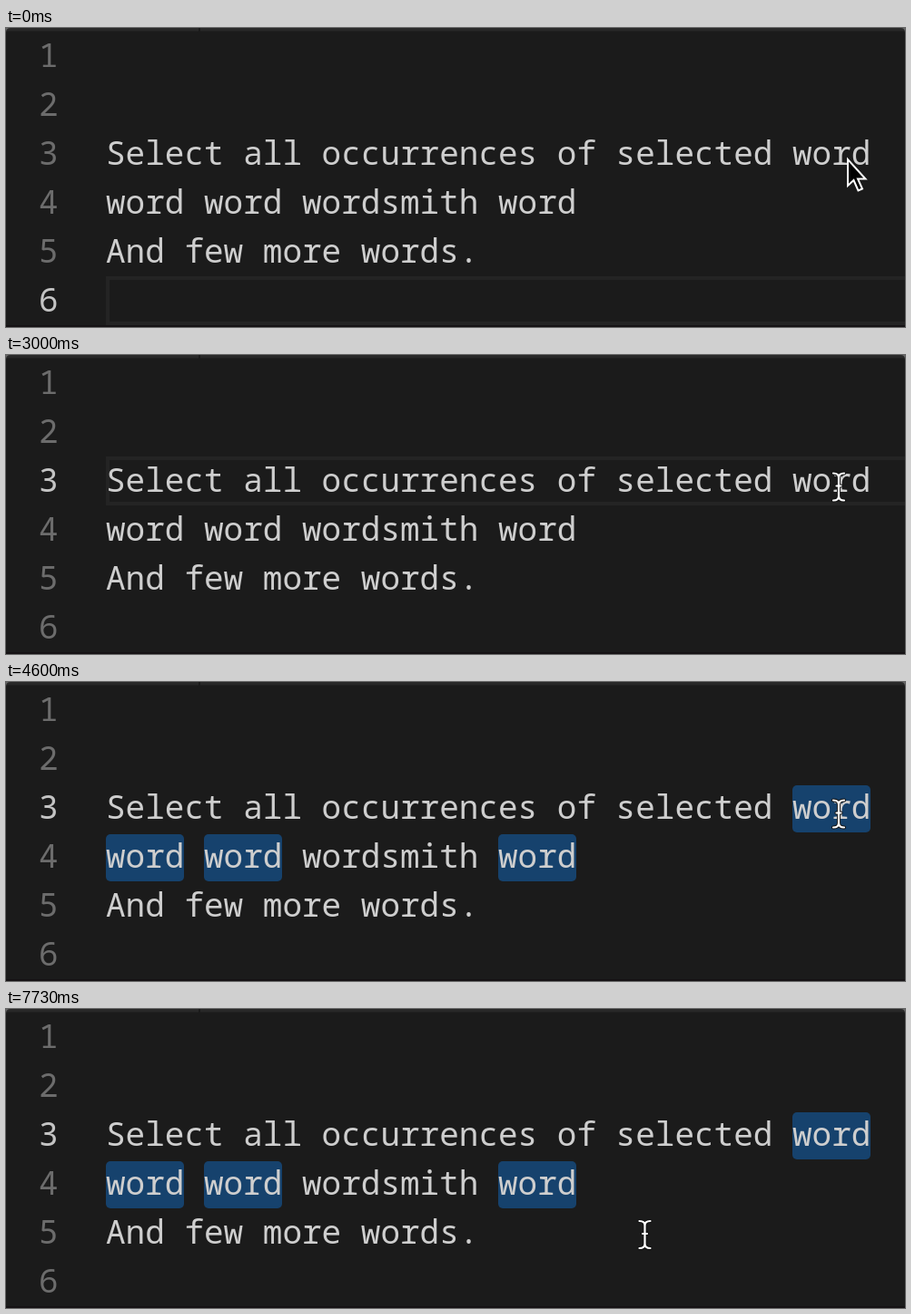
Write an HTML page that moves like this. It is 990 px wide and 330 px high and loops after 8 s.

```html
<!DOCTYPE html>
<html lang="en">
<head>
<meta charset="utf-8">
<title>Select all occurrences</title>
<style>
  html, body { margin: 0; width: 100%; height: 100%; overflow: hidden; background: #1b1b1b; }
  svg { display: block; width: 990px; height: 330px; }
  text { font: 36px "Noto Sans Mono", monospace; fill: #cecece; }
  .number { fill: #6c6c6c; }
  .number.active { fill: #c4c4c4; }
  .selection { fill: #16426d; }
  .caret { fill: #aeafad; }
  #toast path { fill: none; stroke: #acacac; stroke-width: 4; stroke-linejoin: round; }
  #toast text { font: 53px Inter, sans-serif; fill: #acacac; }
  #toast g { filter: drop-shadow(0 2px 2px #000a); }
</style>
</head>
<body>
<svg viewBox="0 0 990 330">
  <defs>
    <path id="beamShape" d="M-6-15Q0-15 0-10Q0-15 6-15M0-10V10M-6 15Q0 15 0 10Q0 15 6 15M-2.500-1H2.500"/>
  </defs>
  <rect width="990" height="330" fill="#1b1b1b"/>
  <rect width="990" height="3.5" fill="#292929"/>
  <rect x="212" width="2" height="4" fill="#1b1b1b"/>
  <path d="M0 0H5Q0 0 0 5ZM990 0h-5q5 0 5 5Z" fill="#666"/>
  <rect y="328" width="990" height="2" fill="#151214"/>
  <rect id="lineBox" x="112" width="900" height="50" fill="none" stroke="#242424" stroke-width="4"/>
  <g id="selections"></g>
  <g id="lines"></g>
  <g id="carets"></g>
  <rect id="singleCaret" class="caret" x="908" y="112" width="4" height="54"/>
  <g id="toast">
    <rect x="98" y="16" width="169" height="90" rx="29" fill="#3c3c3c"/>
    <g>
      <path d="M143.5 47 163.5 66H154V81.500H133V66H123.500Z"/>
      <path transform="translate(192.500 64)" d="M6-11.500a5.500 5.500 0 1 1 5.500 5.500H-11.500a5.500 5.500 0 1 1 5.500-5.500V11.500a5.500 5.500 0 1 1-5.500-5.500H11.500a5.500 5.500 0 1 1-5.500 5.500Z"/>
      <text x="214" y="82">L</text>
    </g>
  </g>
  <path id="arrow" d="M1 2V31L7.500 25 12.500 36.500 17 34.500 12 23.500H20.500Z" fill="#000" stroke="#fff" stroke-width="2"/>
  <g id="beam" fill="none" stroke-linecap="round">
    <use href="#beamShape" stroke="#111" stroke-width="4"/>
    <use href="#beamShape" stroke="#fff" stroke-width="2.200"/>
  </g>
</svg>
<script>
const LOOP = 8000, LINE = 54, COLUMN = 21.6, LEFT = 110;
const CLICK = 530, SELECT = 3070, TOAST_FADE = 4070;
const $ = id => document.getElementById(id);

function add(parent, tag, attributes, content = '') {
  const node = document.createElementNS('http://www.w3.org/2000/svg', tag);
  for (const key in attributes) node.setAttribute(key, attributes[key]);
  node.textContent = content;
  return parent.appendChild(node);
}

const lines = ['', '', 'Select all occurrences of selected word',
  'word word wordsmith word', 'And few more words.', ''];

const numbers = lines.map((line, i) => {
  const y = 43 + i * LINE;
  add($('lines'), 'text', { x: LEFT, y }, line);
  for (const match of line.matchAll(/\bword\b/g)) {
    const x = Math.round(LEFT + match.index * COLUMN), top = 4 + i * LINE;
    add($('selections'), 'rect', { class: 'selection', x, y: top + 2, width: 86, height: 52, rx: 5 });
    add($('carets'), 'rect', { class: 'caret', x: x + 84, y: top, width: 4, height: LINE });
  }
  return add($('lines'), 'text', { class: 'number', x: 36, y }, i + 1);
});

// [start time, shape, x, y]
const pointerStops = [
  [0, 'arrow', 926, 143], [70, 'arrow', 965, 183], [130, 'beam', 940, 168],
  [200, 'beam', 921, 155], [470, 'beam', 917, 145.5],
  [7670, 'beam', 800, 202], [7730, 'beam', 703.5, 249]
];

const show = (id, opacity) => $(id).setAttribute('opacity', +opacity);

function draw(t) {
  const clicked = t >= CLICK, selected = t >= SELECT;
  const activeLine = clicked ? 2 : 5;
  numbers.forEach((node, i) => node.classList.toggle('active', i === activeLine));
  $('lineBox').setAttribute('y', 6 + activeLine * LINE);
  show('lineBox', !selected);
  show('selections', selected);
  show('carets', selected && (t - SELECT) % 1000 < 530);
  show('singleCaret', clicked && !selected && t % 1000 >= 470);

  const fadeStep = Math.floor((t - TOAST_FADE) / 65) + 1;
  show('toast', selected ? Math.min(1, Math.max(0, 1 - fadeStep / 3)) : 0);

  const [, shape, x, y] = pointerStops.findLast(stop => stop[0] <= t);
  for (const id of ['arrow', 'beam']) show(id, id === shape);
  $(shape).setAttribute('transform', `translate(${x} ${y})`);
}

function tick() {
  draw(performance.now() % LOOP);
  requestAnimationFrame(tick);
}
tick();
</script>
</body>
</html>
```
